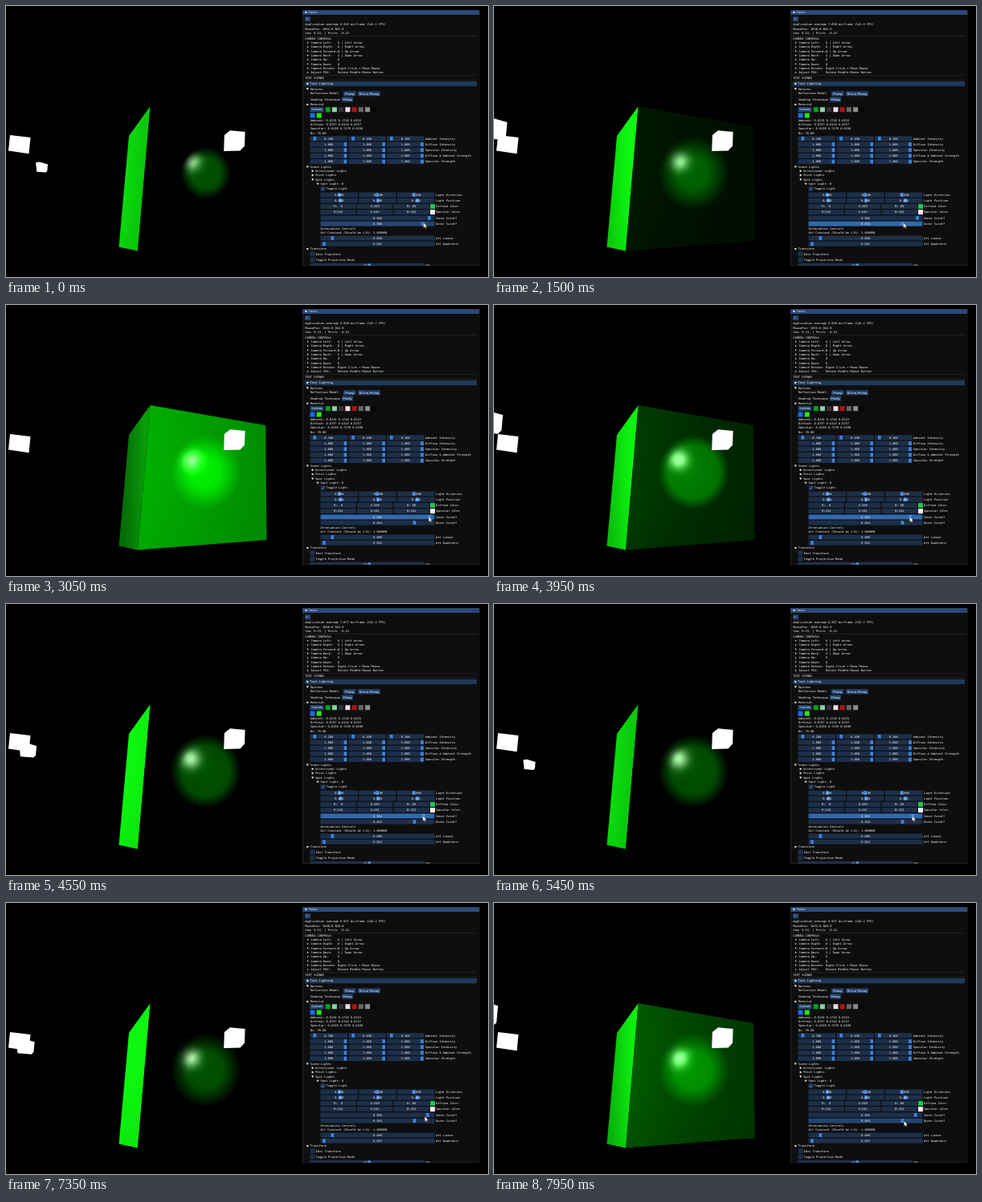
Write an HTML page with a canvas that moves like this. It is 600 px wide and 338 px high and loops after 8000 ms.

```html
<!DOCTYPE html>
<html lang="en">
<head>
<meta charset="utf-8">
<title>Test Lighting</title>
<style>
html, body { margin: 0; width: 100%; height: 100%; overflow: hidden; background: #000; }
canvas, svg { position: absolute; left: 0; top: 0; width: 600px; height: 338px; }
text { font: 3.633px "DejaVu Sans Mono", monospace; fill: #fff; white-space: pre; }
</style>
</head>
<body>
<canvas id="scene" width="600" height="338"></canvas>
<svg id="panel" viewBox="0 0 600 338">
  <defs><clipPath id="window"><rect x="369" y="5" width="220.5" height="319"/></clipPath></defs>
  <g id="ui" clip-path="url(#window)"></g>
  <path id="cursor" d="M0 0V7L1.6 5.6L2.7 8L3.8 7.5L2.8 5.2H4.8Z" fill="#fff" stroke="#000" stroke-width=".4"/>
</svg>
<script>
const DURATION = 8000, STEP = 50;
const FRAME = '#1d2f49', HOVER = '#234571', ACTIVE = '#3169ac';
const BUTTON = '#234571', GRAB = '#3d85e0';
const clamp = (v, lo = 0, hi = 1) => Math.min(hi, Math.max(lo, v));
const ui = document.getElementById('ui');

// ---------- panel ----------
function add(name, attrs) {
  const node = document.createElementNS('http://www.w3.org/2000/svg', name);
  for (const key in attrs) node.setAttribute(key, attrs[key]);
  return ui.appendChild(node);
}
const rect = (x, y, width, height, fill) => add('rect', { x, y, width, height, fill });
function text(x, y, string, anchor = 'start') {
  const node = add('text', { x, y: y + 1.25, 'text-anchor': anchor });
  node.textContent = string;
  return node;
}
function arrow(x, y, open = true) {
  const d = open ? `M${x - 1.5} ${y - 1}h3l-1.5 2.6z` : `M${x - 1} ${y - 1.5}v3l2.6 -1.5z`;
  add('path', { d, fill: '#fff' });
}
function tree(x, y, label, open = true) {
  arrow(x - 3.5, y, open);
  text(x, y, label);
}
function line(y) { rect(372, y, 214, .35, '#43434d'); }
function button(x, y, width, label) {
  rect(x, y - 3, width, 6, BUTTON);
  text(x + width / 2, y, label, 'middle');
}
function slider(x, y, width, value, grabX) {
  const frame = rect(x, y - 3, width, 6, FRAME);
  const grab = grabX === undefined ? null : rect(grabX - 1.8, y - 2.4, 3.6, 4.8, GRAB);
  return { frame, grab, label: text(x + width / 2, y, value, 'middle') };
}
function sliders3(x, y, values, offsets, label, width = 46.5) {
  values.forEach((value, i) => {
    const left = x + i * (width + 1.25);
    slider(left, y, width, value, offsets && left + offsets[i] * width);
  });
  text(x + 143.5, y, label);
}
function checkbox(x, y, label, checked) {
  rect(x, y - 3, 6, 6, FRAME);
  if (checked) add('path', { d: `M${x + 1.2} ${y}l1.4 1.5l2.4 -3.2`, fill: 'none', stroke: '#4296fa', 'stroke-width': .8 });
  text(x + 7.3, y, label);
}

rect(369, 5, 220.5, 319, '#0e0e0f');
rect(369, 5, 220.5, 6, '#294a7a');
arrow(373.4, 8);
text(376.5, 8, 'Tests');
button(372, 16.2, 7, '<-');
const fpsText = text(372.3, 23.2, '');
const mouseText = text(372.3, 28.6, '');
text(372.3, 34, 'Yaw: 0.53, | Pitch: -0.23');
line(37.3);
text(372.3, 40.3, 'CAMERA CONTROLS');
[['Left', 'A | Left Arrow'], ['Right', 'D | Right Arrow'], ['Forward', 'W | Up Arrow'],
 ['Back', 'S | Down Arrow'], ['Up', 'E'], ['Down', 'Q'], ['Rotate', 'Right-Click + Move Mouse']]
  .map(([name, keys]) => [`Camera ${name}:`, keys])
  .concat([['Adjust FOV:', 'Rotate Middle Mouse Button']])
  .forEach(([name, keys], i) => {
    const y = 45.7 + i * 5.32;
    add('circle', { cx: 375.6, cy: y, r: .8, fill: '#fff' });
    text(379.6, y, name);
    text(413, y, keys);
  });
line(86.2);
text(372.3, 89.3, 'TEST SCENES');
line(92.6);
rect(372, 94, 214, 6.2, '#1f3958');
tree(378.8, 97.1, 'Test Lighting');

tree(378.8, 103.3, 'Options');
text(378.8, 109.2, 'Reflection Model:');
button(420, 109.3, 15.5, 'Phong');
button(438, 109.3, 28, 'Blinn-Phong');
text(378.8, 116.5, 'Shading Technique');
button(418, 116.5, 14, 'Phong');
tree(378.8, 123, 'Material');
button(378.5, 129.2, 17, 'Custom');
['#08a021', '#8bd0a4', '#35323e', '#f0dddd', '#ad1616', '#666', '#8b8b8b', '#050505']
  .forEach((color, i) => rect(397.7 + i * 8.23, 126.2, 6, 6, color));
rect(378.5, 133.5, 6, 6, '#176ef0');
rect(386.7, 133.5, 6, 6, '#28e41c');
['Ambient: 0.0215 0.1745 0.0215', 'Diffuse: 0.0757 0.6142 0.0757',
 'Specular: 0.6330 0.7278 0.6330', 'Ns: 76.80']
  .forEach((row, i) => text(378.8, 142.4 + i * 5.32, row));
['Ambient Intensity', 'Diffuse Intensity', 'Specular Intensity',
 'Diffuse & Ambient Strength', 'Specular Strength'].forEach((label, i) => {
  const offset = i ? .945 : .125;
  sliders3(378.5, 165.3 + i * 7.19, Array(3).fill(i ? '1.000' : '0.100'), Array(3).fill(offset), label);
});

tree(378.8, 200.4, 'Scene Lights');
tree(385.2, 205.8, 'Directional Lights', false);
tree(385.2, 211.1, 'Point Lights', false);
tree(385.2, 216.4, 'Spot Lights');
tree(391.6, 221.7, 'Spot Light: 0');
checkbox(391.5, 228, 'Toggle Light', true);
sliders3(391.5, 235.5, ['0.000', '-0.100', '-1.000'], [.5, .49, .45], 'Light Direction');
sliders3(391.5, 242.6, ['0.450', '0.100', '0.450'], [.53, .51, .54], 'Light Position');
sliders3(391.5, 249.9, ['R:  0', 'G:209', 'B: 60'], null, 'Diffuse Color', 44.3);
sliders3(391.5, 257.1, ['R:241', 'G:241', 'B:241'], null, 'Specular Color', 44.3);
rect(528, 246.9, 6, 6, '#1dc653');
rect(528, 254.1, 6, 6, '#f1f1f1');
const inner = slider(391.5, 264.4, 142, '', 527);
const outer = slider(391.5, 271.6, 142, '', 519);
text(535, 264.4, 'Inner Cutoff');
text(535, 271.6, 'Outer Cutoff');
text(391.6, 277.7, 'Attenuation Controls');
text(391.6, 283, 'Att Constant (Should be 1.0): 1.000000');
slider(391.5, 289.5, 142, '0.090', 406.3);
slider(391.5, 296.7, 142, '0.032', 396);
text(535, 289.5, 'Att Linear');
text(535, 296.7, 'Att Quadratic');
tree(378.8, 303, 'Transform');
checkbox(378.5, 309.3, 'Edit Transform');
checkbox(378.5, 316.5, 'Toggle Projection Mode');
slider(378.5, 323.7, 142, '67.0', 452);
text(522, 323.7, 'FOV');
add('rect', { x: 369.2, y: 5.2, width: 220.1, height: 318.6, fill: 'none', stroke: '#3c3c46', 'stroke-width': .4 });

// time, cursor x, cursor y, inner cutoff, outer cutoff
const drag = [
  [0, 519.6, 269.8, .966, .906],
  [1350, 509.4, 269.8, .966, .834],
  [2350, 509.4, 269.8, .966, .834],
  [2900, 526, 263.6, .966, .834],
  [3100, 526, 263.6, .966, .834],
  [3900, 517.2, 263.8, .902, .834],
  [4550, 518.8, 264, .914, .834],
  [6400, 522, 264, .936, .834],
  [7200, 524.4, 264, .95, .834],
  [7850, 510.3, 271.5, .95, .834],
  [8000, 510.3, 271.5, .95, .834]
];
const frameTimes = [[0, 6.941], [800, 7.05], [1700, 6.959], [3400, 6.938], [4300, 7.077], [5150, 6.957], [6850, 6.937]];

function dragAt(t) {
  const i = drag.findIndex((row, n) => n && row[0] >= t);
  const a = drag[i - 1], b = drag[i], k = (t - a[0]) / (b[0] - a[0]);
  return a.slice(1).map((v, n) => v + (b[n + 1] - v) * k);
}
function setCutoff({ frame, grab, label }, value, state) {
  grab.setAttribute('x', 525.2 + (value - .966) / .0071);
  grab.setAttribute('fill', state === ACTIVE ? '#4296fa' : GRAB);
  frame.setAttribute('fill', state);
  label.textContent = value.toFixed(3);
}
function drawPanel(t, [x, y, innerCut, outerCut]) {
  const ms = frameTimes.filter(([from]) => from <= t).pop()[1];
  fpsText.textContent = `Application average ${ms.toFixed(3)} ms/frame (${(1000 / ms).toFixed(1)} FPS)`;
  mouseText.textContent = `MousePos: ${Math.round(x * 3.2)}.0 ${Math.round(y * 3.2)}.0`;
  setCutoff(inner, innerCut, t > 2850 && t < 7250 ? ACTIVE : FRAME);
  setCutoff(outer, outerCut, t > 50 && t < 2300 ? ACTIVE : t <= 50 || t > 7750 ? HOVER : FRAME);
  document.getElementById('cursor').setAttribute('transform', `translate(${x} ${y})`);
}

// ---------- scene ----------
const ctx = document.getElementById('scene').getContext('2d');
const BOX = { x: 138, y: 122, w: 190, h: 186 };
const buffer = document.createElement('canvas');
buffer.width = BOX.w;
buffer.height = BOX.h;
const bufferCtx = buffer.getContext('2d');
const pixels = bufferCtx.createImageData(BOX.w, BOX.h);
const leftFace = [[179.6, 125], [153, 162], [140.5, 300.5], [164, 305.5]];
const frontFace = [[179.6, 125], [323, 150], [324.5, 293], [164, 305.5]];

function trace(points) {
  ctx.beginPath();
  points.forEach(([x, y]) => ctx.lineTo(x, y));
  ctx.closePath();
}
function whiteShape(points) {
  trace(points);
  ctx.fillStyle = '#fff';
  ctx.fill();
}
// Fills one face with a per-pixel shader writing [r, g, b].
function shadeFace(points, shader) {
  const data = pixels.data;
  for (let j = 0, p = 0; j < BOX.h; j++) {
    for (let i = 0; i < BOX.w; i++) {
      const color = shader(BOX.x + i + .5, BOX.y + j + .5);
      data[p++] = color[0];
      data[p++] = color[1];
      data[p++] = color[2];
      data[p++] = 255;
    }
  }
  bufferCtx.putImageData(pixels, 0, 0);
  ctx.save();
  trace(points);
  ctx.clip();
  ctx.drawImage(buffer, BOX.x, BOX.y);
  ctx.restore();
}

function drawScene(t, innerCut, outerCut) {
  // The lamp swings along the depth axis; cube units have the front face at z = 0.
  const swing = Math.cos((t + 375) / 1000);
  const depth = 1.341 + swing;
  const lamp = { x: -1.15, y: .8, z: -3 * (swing + .25) };

  ctx.fillStyle = '#000';
  ctx.fillRect(0, 0, 600, 338);

  shadeFace(leftFace, (px, py) => {
    const z = -clamp((172 - px) / 26, 0, 1);
    const dz = lamp.z - z;
    const dy = lamp.y - (303 - py) / 165;
    const level = 250 / (1 + dz * dz * (dz > 0 ? .13 : .02) + dy * dy * .12);
    return [level * .05, level, level * .06];
  });

  shadeFace(frontFace, (px, py) => {
    const dx = lamp.x - (px - 172) / 150;
    const dy = lamp.y - (299 - py) / 160;
    const lit = lamp.z > 0 ? 200 * lamp.z / Math.hypot(dx, dy, lamp.z) : 0;
    const cone = 1 / Math.hypot(1, (px - 248.5) / 67, (py - 208.5) / 70);
    const spot = clamp((cone - outerCut) / (innerCut - outerCut));
    const gloss = 170 * spot * Math.exp(-((px - 230) ** 2 + (py - 193) ** 2) / 130);
    return [gloss, lit + 80 * spot * cone + gloss, gloss];
  });

  whiteShape([[5, 161], [30.5, 164], [28.5, 184.2], [3, 180.6]]);
  whiteShape([[271.8, 161], [279, 155.3], [297.6, 157], [297, 174.6], [291.5, 180.4], [271.2, 181]]);

  const cx = 82.2 - 85.5 / depth, cy = 242 - 93 / depth;
  whiteShape([[-.5, -.45], [-.2, -.5], [.5, -.27], [.45, .36], [.32, .5], [-.42, .43]]
    .map(([x, y]) => [cx + x * 34 / depth, cy + y * 29.5 / depth]));
}

function render(now) {
  const t = Math.floor((now % DURATION) / STEP) * STEP;
  const state = dragAt(t);
  drawPanel(t, state);
  drawScene(t, state[2], state[3]);
}
let start;
function tick(now) {
  start ??= now;
  render(now - start);
  requestAnimationFrame(tick);
}
render(0);
requestAnimationFrame(tick);
</script>
</body>
</html>
```
